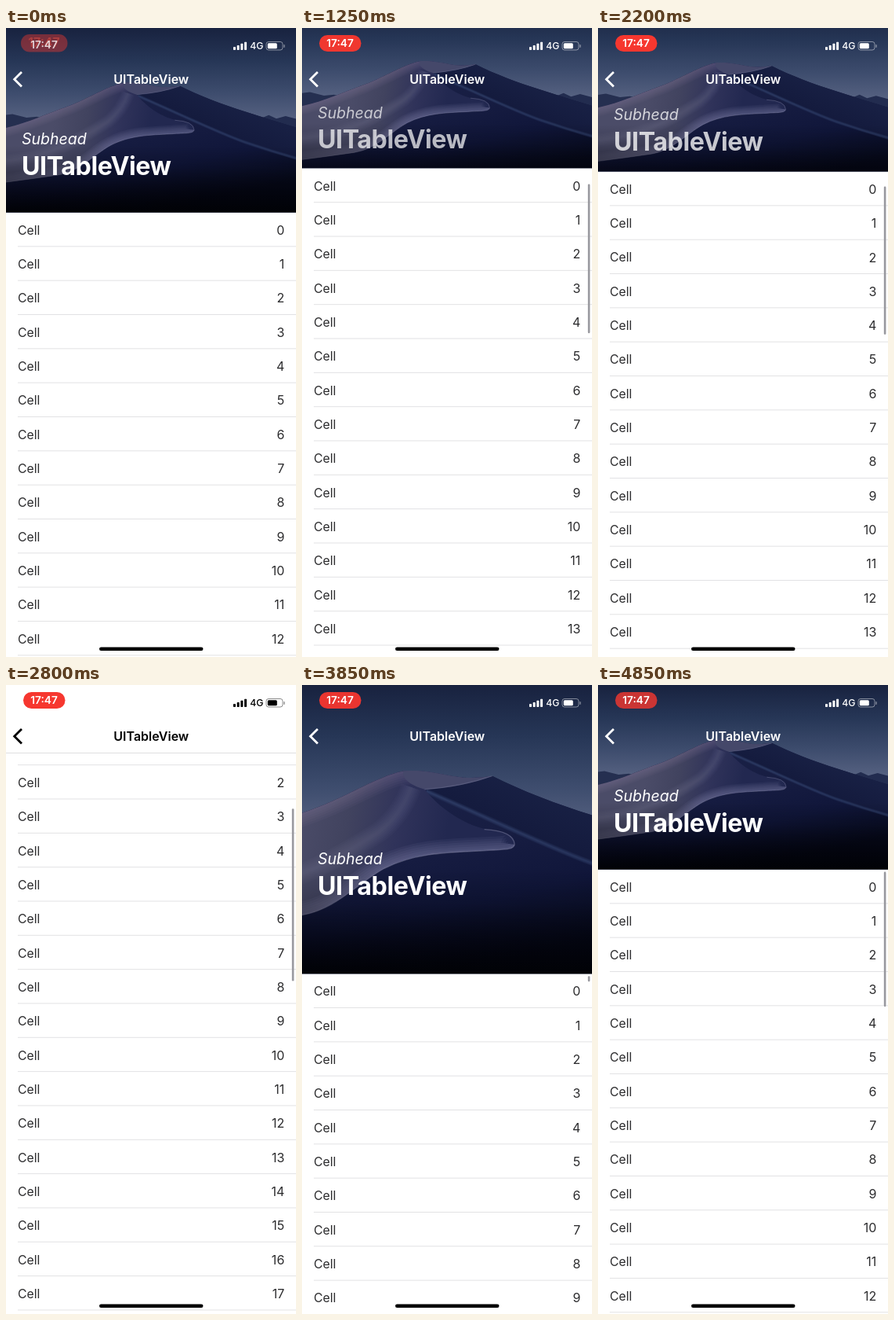
These frames come from a looping animation (370 by 800 pixels, 4.9 s). An HTML page with a canvas:

```html
<!DOCTYPE html>
<html lang="en">
<head>
<meta charset="utf-8">
<style>
  html, body { margin: 0; width: 370px; height: 800px; overflow: hidden; background: #fff; }
  canvas { display: block; }
</style>
</head>
<body>
<canvas id="stage" width="370" height="800"></canvas>
<script>
const ctx = document.getElementById('stage').getContext('2d');
const LOOP = 4900, W = 370, H = 800;
const ROW = 43.33, REST = 234.5, NAV = 87, FONT = 'Inter, Roboto, sans-serif';

// [time, bottom edge of the header, which is also the top of the list]
const scroll = [[0, 234.5], [100, 234.5], [480, 296], [850, 248], [1150, 222], [1450, 75],
  [1700, 28.6], [2150, 175], [2400, 180], [2800, 15], [3000, 35], [3500, 301],
  [3900, 368], [4150, 362], [4550, 241], [4850, 234.5], [4900, 234.5]];
const pillAlpha = [[0, .42], [200, .85], [850, .93], [1700, 1], [3500, .98], [4150, .9], [4900, .8]];

const clamp = (v, lo = 0, hi = 1) => Math.min(hi, Math.max(lo, v));

// Smooth curve through the keys
function curve(keys, t) {
  const i = clamp(keys.findIndex(k => k[0] > t) - 1, 0, keys.length - 2);
  const slope = n => {
    const a = keys[n - 1], b = keys[n], c = keys[n + 1];
    if (!a || !c || (b[1] - a[1]) * (c[1] - b[1]) <= 0) return 0;
    return (c[1] - a[1]) / (c[0] - a[0]);
  };
  const [t0, v0] = keys[i], [t1, v1] = keys[i + 1], d = t1 - t0, u = (t - t0) / d;
  const s = u * u * (3 - 2 * u);
  return v0 + (v1 - v0) * s + d * u * (1 - u) * (slope(i) * (1 - u) - slope(i + 1) * u);
}

function gradient(x0, y0, x1, y1, ...colors) {
  const g = ctx.createLinearGradient(x0, y0, x1, y1);
  colors.forEach((c, i) => g.addColorStop(i / (colors.length - 1), c));
  return g;
}

function text(str, x, y, font, color, align = 'left', spacing = 0) {
  ctx.font = `${font} ${FONT}`;
  ctx.letterSpacing = spacing + 'px';
  ctx.fillStyle = color;
  ctx.textAlign = align;
  ctx.fillText(str, x, y);
}

function box(x, y, w, h, r, color) {
  ctx.fillStyle = color;
  ctx.beginPath();
  ctx.roundRect(x, y, w, h, r);
  ctx.fill();
}

function shape(path, fill) {
  ctx.fillStyle = fill;
  ctx.fill(new Path2D(path));
}

function line(path, color, width) {
  ctx.strokeStyle = color;
  ctx.lineWidth = width;
  ctx.stroke(new Path2D(path));
}

// Soft band of light along a path
function glow(path, color, width) {
  for (let i = 1; i <= 6; i++) line(path, color, width * i / 6);
}

function drawDunes(h) {
  const size = Math.max(h, 232), s = size / 362;
  ctx.save();
  ctx.translate(185, (h - size) / 2);
  ctx.scale(s, s);
  ctx.translate(-185, 0);

  ctx.fillStyle = gradient(0, 0, 0, 190, '#18223f', '#263656', '#3d4c6d', '#5b6685');
  ctx.fillRect(-110, 0, 590, 363);
  shape('M-110 172 L-88 169 L-60 176 L-40 174 L0 184 V230 H-110Z', '#252f50');
  shape('M350 172 L395 180 L417 171 L432 178 L450 173 L480 181 V260 H350Z', '#222c4f');

  const ridge = 'M-110 198 C-60 188 -20 168 15 156 C60 140 98 114 130 108 C155 105 185 114 205 116 Q225 117 242 114';
  const slope = 'C280 133 325 150 370 164 Q425 182 480 198';
  shape(`${ridge} ${slope} V363 H-110Z`,
    gradient(180, 120, 230, 350, '#1a2147', '#171d42', '#10163a', '#080c20'));
  shape(`M242 114 ${slope} V262 C380 232 260 177 157 131 Q205 127 242 114Z`,
    gradient(280, 125, 250, 200, '#182044', '#12183a'));
  glow('M159 133 C240 168 320 207 372 225 S450 250 480 258', 'rgba(70,86,130,.09)', 7);

  const edge = 'C172 151 208 179 242 182 C261 184 271 191 270 200';
  const foot = 'C269 208 252 206 226 208 C182 210 143 211 106 230 C70 250 45 282 0 289 Q-55 297 -110 304';
  const face = `${ridge} Q205 127 157 131 ${edge} ${foot}Z`;
  shape(face, gradient(0, 150, 185, 185, '#4b4c68', '#41435f', '#30335a', '#222850'));

  ctx.save();
  ctx.clip(new Path2D(face));
  glow(ridge, 'rgba(140,136,155,.055)', 34);
  glow('M-110 262 C-15 254 40 222 100 184 Q128 162 140 128', 'rgba(150,146,170,.035)', 26);
  glow('M270 200 ' + foot, 'rgba(150,148,180,.075)', 34);
  ctx.restore();

  shape('M130 108 C155 105 185 114 205 116 Q225 117 242 114 Q205 128 157 131 C140 126 128 118 130 108Z', '#45486a');
  line('M157 131 Q205 127 242 114', 'rgba(140,145,175,.25)', 1.5);
  line('M232 181 Q269 183 270 200 ' + foot, 'rgba(165,166,195,.35)', 1.3);

  ctx.fillStyle = gradient(0, 230, 0, 362, 'rgba(0,0,5,0)', 'rgba(0,0,5,.2)', 'rgba(0,0,5,.6)', '#010206');
  ctx.fillRect(-110, 230, 590, 134);
  ctx.restore();
}

function drawHeader(h, white) {
  const height = Math.max(h, NAV);
  ctx.save();
  ctx.beginPath();
  ctx.rect(0, 0, W, height);
  ctx.clip();
  if (white < 1) {
    drawDunes(height);
    const y = 177.5 + .603 * (h - REST);
    ctx.globalAlpha = clamp((h - 125) / 75);
    text('Subhead', 20, y - 35, 'italic 400 19.5px', '#fff');
    text('UITableView', 20, y, '700 32.2px', '#fff', 'left', -.45);
  }
  ctx.globalAlpha = white;
  ctx.fillStyle = '#fff';
  ctx.fillRect(0, 0, W, height);
  ctx.fillStyle = '#dedee0';
  ctx.fillRect(0, height - 1, W, 1);
  ctx.restore();
}

function drawBars(t, white) {
  const level = Math.round(255 * (1 - white)), ink = `rgb(${level},${level},${level})`;
  line('M20 56 L10.7 65.2 L20 74.5', ink, 2.8);
  text('UITableView', 185.3, 66, '600 16px', ink, 'center');

  for (let i = 0; i < 4; i++) box(290 + i * 4.7, 24 - i * 2.1, 3, 4 + i * 2.1, .8, ink);
  text('4G', 311.2, 23.7, '500 12.3px', ink);
  ctx.globalAlpha = .45;
  ctx.strokeStyle = ink;
  ctx.lineWidth = 1;
  ctx.beginPath();
  ctx.roundRect(332, 17.5, 21, 10.5, 3);
  ctx.stroke();
  box(354.3, 21, 1.4, 4, 1, ink);
  ctx.globalAlpha = 1;
  box(333.8, 19.3, 12, 7, 1.5, ink);

  const fresh = clamp(1 - t / 150), grow = 3 * fresh;
  ctx.globalAlpha = curve(pillAlpha, t);
  box(22 - grow, 9 - grow / 3, 53.5 + 2 * grow, 21 + grow / 2, 11, '#f6372f');
  ctx.globalAlpha = fresh * .7;
  text('17:47', 48.5, 19, '600 16px', '#c4453f', 'center');
  ctx.globalAlpha = 1 - fresh * .2;
  text('17:47', 48.5, 20 + 2 * fresh, '600 13.7px', '#fff', 'center');
  ctx.globalAlpha = 1;
}

function drawList(h) {
  for (let i = 0; h + i * ROW < H; i++) {
    const y = h + i * ROW;
    text('Cell', 15, y + 23.5, '400 15.8px', '#2c2c2e');
    text(i, 355.3, y + 23.5, '400 16px', '#2c2c2e', 'right');
    ctx.fillStyle = '#e2e2e4';
    ctx.fillRect(15, y + ROW - .5, W - 15, 1);
  }
}

function drawScrollbar(t, h) {
  const top = Math.max(h, NAV);
  const y = top + 3 + .306 * Math.max(0, REST - h);
  const length = Math.max(7, .323 * (766 - top) - Math.max(0, h - REST));
  ctx.globalAlpha = clamp((t - 80) / 100);
  box(364.8, y, 2.6, length, 1.3, '#98989e');
  ctx.globalAlpha = 1;
}

function draw(t) {
  const h = curve(scroll, t), white = clamp((130 - h) / 70);
  ctx.fillStyle = '#fff';
  ctx.fillRect(0, 0, W, H);
  ctx.textBaseline = 'middle';
  drawList(h);
  drawHeader(h, white);
  drawBars(t, white);
  drawScrollbar(t, h);
  box(119, 787.5, 132.5, 4.6, 2.3, '#000');
}

const start = performance.now();
function frame() {
  draw((performance.now() - start) % LOOP);
  requestAnimationFrame(frame);
}
frame();
</script>
</body>
</html>
```
